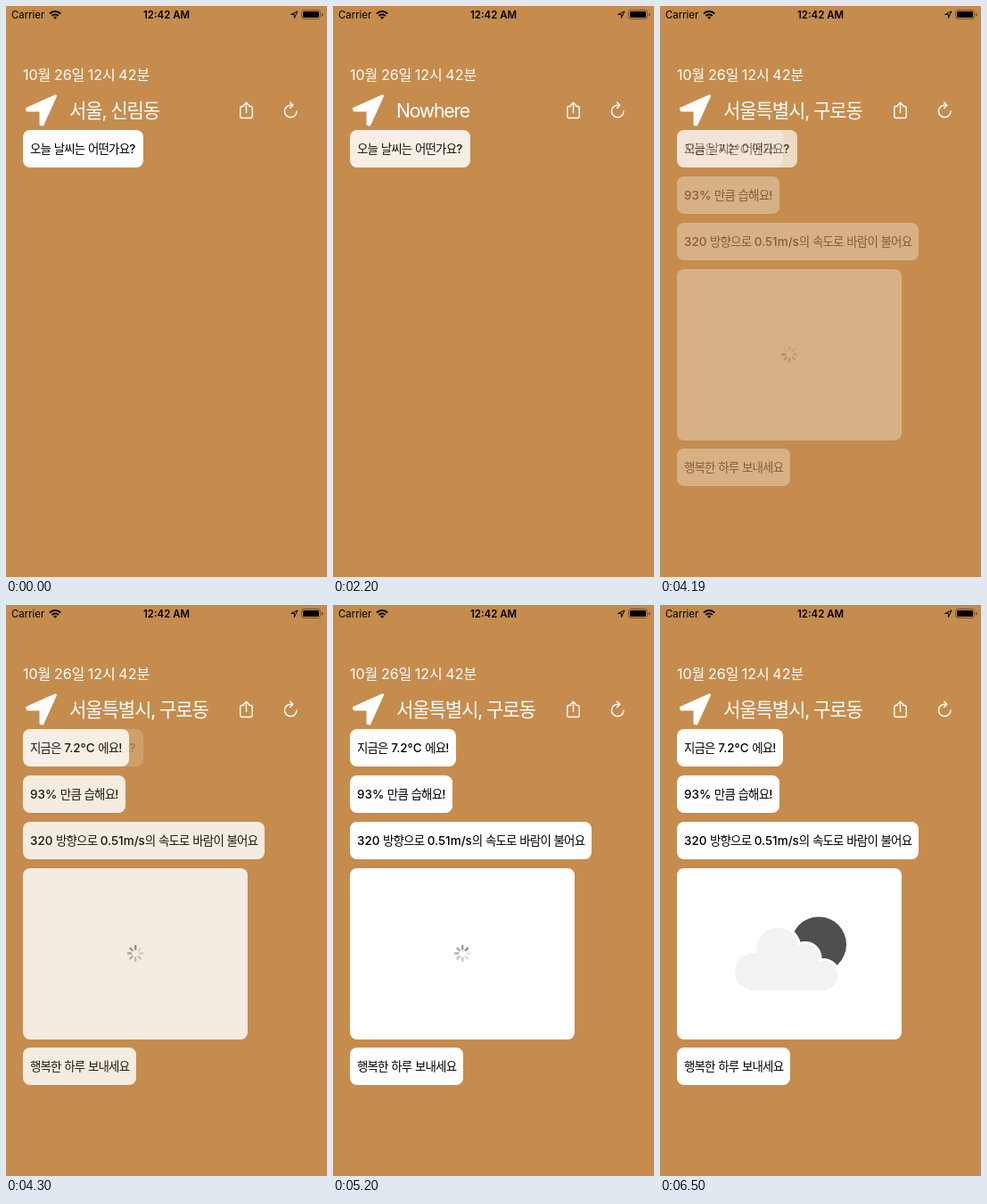
These frames come from a looping animation (360x640 px, 6540 ms). An HTML page:

```html
<!DOCTYPE html>
<html lang="ko">
<head>
<meta charset="utf-8">
<style>
html, body { margin: 0; width: 100%; height: 100%; overflow: hidden; background: #c58c4d; }
svg { display: block; width: 360px; height: 640px; }
text { font: 500 13.44px Inter, "Noto Sans CJK KR", "Noto Sans CJK", sans-serif; white-space: pre; }
.ko { letter-spacing: -.06em; }
#date { font-size: 16px; font-weight: 400; fill: #fff; }
#place { font-size: 21.1px; font-weight: 400; letter-spacing: -.055em; fill: #fff; }
.carrier { font-size: 11.4px; font-weight: 400; }
.clock { font-size: 11.4px; font-weight: 600; text-anchor: middle; }
.line { fill: none; stroke: #fff; stroke-width: 1.4; stroke-linecap: round; stroke-linejoin: round; }
</style>
</head>
<body>
<svg viewBox="0 0 360 640" id="stage"></svg>
<script>
const LOOP = 6540;
// The screen only refreshes at these moments.
const TICKS = [0, 1890, 1990, 2090, 2200, 3930, 4080, 4190, 4300, 4450, 4550, 4650, 4750, 4850,
  5000, 5100, 5200, 5300, 5400, 5510, 5730, 5840, 5950, 6060, 6170, 6280, 6390, 6500];

const korean = s => s.replace(/[가-힣]+/g, '<tspan class="ko">$&</tspan>');
const box = (y, w, h = 42) => `<rect x="19" y="${y}" width="${w}" height="${h}" rx="8" fill="#fff"/>`;
const bubble = (y, w, s) => box(y, w) + `<text x="27" y="${y + 26}">${korean(s)}</text>`;
const spinner = (id, x, y, scale, color) =>
  `<g id="${id}" transform="translate(${x} ${y}) scale(${scale})" stroke="${color}" stroke-width="2.4" stroke-linecap="round">` +
  [...Array(8).keys()].map(i => `<path d="M0-4.9V-8.2" transform="rotate(${i * 45})"/>`).join('') + '</g>';

const question = bubble(139, 135, '오늘 날씨는 어떤가요?');
const cloud = [[105, 411, 21], [132, 385, 23.5], [163, 395.5, 15.5], [183, 415.5, 16.5]]
  .map(([x, y, r]) => `<circle cx="${x}" cy="${y}" r="${r}"/>`).join('') +
  '<path d="M105 392H165L184 410V432H105Z"/>';

const statusBar = `
  <text class="carrier" x="6" y="14">Carrier</text>
  <g fill="none" stroke="#000" stroke-width="2">
    <path d="M49 8.6a8.5 8.5 0 0 1 12.2 0M51.4 11.1a5.2 5.2 0 0 1 7.4 0"/>
  </g>
  <path d="M55.1 14.8 53 12.7a3 3 0 0 1 4.2 0Z"/>
  <text class="clock" x="180" y="14">12:42 AM</text>
  <path d="M327 6 319.6 9.5H323.4V13.5Z" fill="none" stroke="#000" stroke-linejoin="round"/>
  <rect x="331.5" y="4.5" width="21" height="10" rx="3" fill="none" stroke="#000" stroke-opacity=".4"/>
  <rect x="333" y="6" width="18" height="7" rx="1.6"/>
  <path d="M354 8a1.6 1.6 0 0 1 0 3.4Z" fill-opacity=".45"/>`;

const header = `
  <text id="date" x="19" y="83.3">${korean('10월 26일 12시 42분')}</text>
  <path d="M55.5 100.8 23.5 115 24 117H39V132.5L41 133Z" fill="#fff" stroke="#fff" stroke-width="3" stroke-linejoin="round"/>
  <text id="place" x="71" y="124.5"></text>
  <path class="line" d="M266.3 112.5h-2a1.5 1.5 0 0 0-1.5 1.5v10a1.5 1.5 0 0 0 1.5 1.5h10.4a1.5 1.5 0 0 0 1.5-1.5v-10a1.5 1.5 0 0 0-1.5-1.5h-2M269.5 119.5v-11.3m-3 3 3-3 3 3"/>
  <path class="line" id="refresh" d="M326 118a6.8 6.8 0 1 1-6.8-6.8h2.6m-3.2-3.3 3.3 3.3-3.3 3.3"/>
  ${spinner('busy', 319.5, 117, .85, '#858a90')}`;

const cards = bubble(139, 119, '지금은 7.2°C 에요!') +
  bubble(191, 115, '93% 만큼 습해요!') +
  bubble(243, 271, '320 방향으로 0.51m/s의 속도로 바람이 불어요') +
  box(295, 252, 192) + spinner('loading', 145.2, 390.5, 1, '#3c3c43') +
  `<g id="weather">
    <circle cx="178" cy="380.5" r="31" fill="#4f4f51"/>
    <g fill="#fff" stroke="#fff" stroke-width="6">${cloud}</g>
    <g fill="#f2f2f2">${cloud}</g>
  </g>` +
  bubble(496, 127, '행복한 하루 보내세요');

const $ = id => document.getElementById(id);
$('stage').innerHTML = statusBar + header +
  `<g id="first">${question}</g><g id="second">${question}</g><g id="cards">${cards}</g>`;

const fade = (t, start) => {
  const u = Math.min(1, Math.max(0, (t - start) / 350));
  return u < .5 ? 2 * u * u : 1 - 2 * (1 - u) ** 2;
};
const show = (id, opacity) => $(id).setAttribute('opacity', opacity);

function spin(id, t) {
  const head = Math.floor((t - 4300) / 100) + 80;
  [...$(id).children].forEach((spoke, i) =>
    spoke.setAttribute('opacity', .58 - .065 * ((head - i) % 8)));
}

function draw(now) {
  const time = now % LOOP;
  const t = TICKS.filter(tick => tick <= time).pop();
  const asked = fade(t, 1950), answered = fade(t, 4050), loaded = fade(t, 5700);
  const busy = t >= 1890 && t < 1990 || t >= 3930 && t < 4080;
  const place = t < 1990 ? '서울, 신림동' : t < 4080 ? 'Nowhere' : '서울특별시, 구로동';
  if ($('place').textContent !== place) $('place').textContent = place;
  show('refresh', busy ? 0 : 1);
  show('busy', busy ? 1 : 0);
  show('first', 1 - asked);
  show('second', asked * (1 - answered));
  show('cards', answered);
  show('loading', 1 - loaded);
  show('weather', loaded);
  spin('busy', t);
  spin('loading', t);
}

const start = performance.now();
function loop() {
  draw(performance.now() - start);
  requestAnimationFrame(loop);
}
loop();
</script>
</body>
</html>
```
